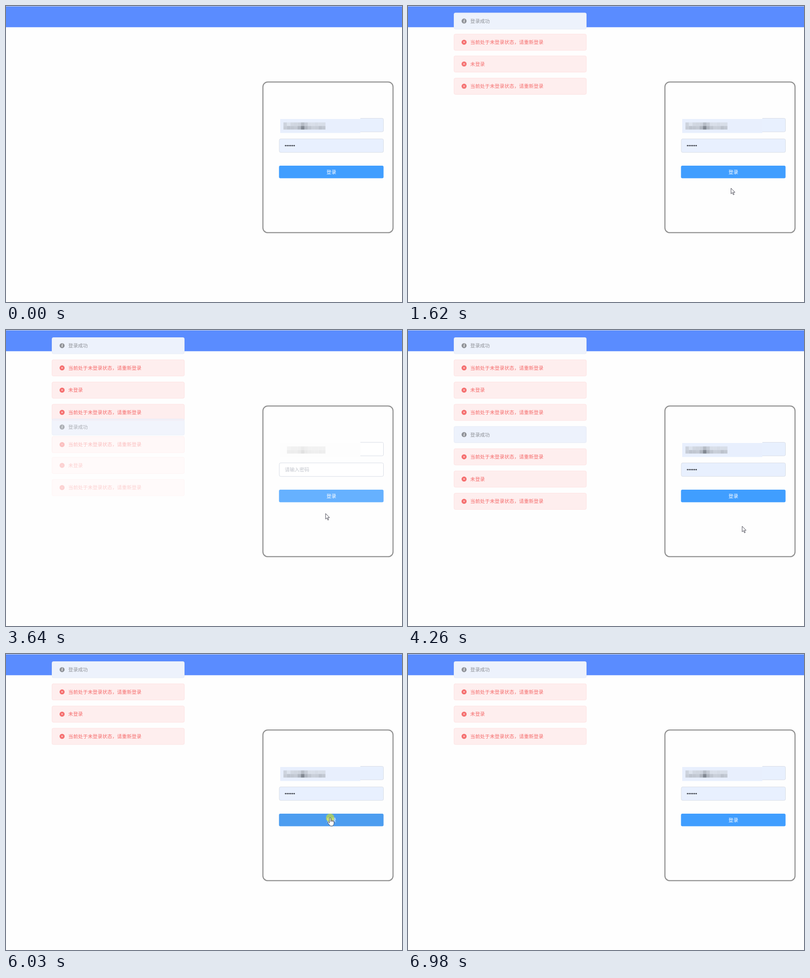
These frames come from a looping animation (865 px wide and 647 px high, 7.99 s). An HTML page with a canvas:

```html
<!DOCTYPE html>
<html lang="zh-CN">
<head>
<meta charset="utf-8">
<style>
html, body { margin: 0; width: 100%; height: 100%; overflow: hidden; background: #fefefe; }
canvas { display: block; }
</style>
</head>
<body>
<canvas id="stage" width="865" height="647"></canvas>
<script>
const ctx = document.getElementById('stage').getContext('2d');
const FONT = '10.67px "Noto Sans CJK SC", "Noto Sans CJK", "Noto Sans", sans-serif';
const LOOP = 7990;

// Each click on the button reloads the page a little later.
const CLICKS = [1000, 3310, 6030];
const RELOADS = [1320, 3514, 6260];

// Pointer stops: time, x, y
const PATH = [
  [150, 771, 597], [700, 708, 358], [1100, 708, 358], [1760, 705, 409],
  [2320, 675, 354], [3400, 675, 354], [3640, 698, 401], [4080, 739, 450],
  [4570, 714.5, 393], [5270, 708, 358], [6110, 708, 358], [6900, 857, 565]
];

const BOX_HEIGHT = 36.5, SLOT = 48.6, LIFE = 2972;
const KINDS = {
  info: { fill: '#edf2fc', border: '#e6ebf5', ink: '#909399' },
  error: { fill: '#feeeee', border: '#fde2e2', ink: '#f56c6c' }
};
const EXPIRED = '当前处于未登录状态，请重新登录';
const messages = RELOADS.flatMap(start => [
  { kind: 'info', text: '登录成功', born: start },
  { kind: 'error', text: EXPIRED, born: start + 52 },
  { kind: 'error', text: '未登录', born: start + 68 },
  { kind: 'error', text: EXPIRED, born: start + 68 }
]);

const ARROW = new Path2D('M0 0V12.2L2.8 9.6 4.9 14.4 6.8 13.6 4.7 9H8.6Z');
const HAND = new Path2D('M-1.4 10.5V1.4a1.4 1.4 0 0 1 2.8 0V6.2q1.4-1 2.6 0 1.4-.7 2.4.3 2-.3 2 1.3V12.5' +
  'q0 2-1.2 3.2-.8 2.3-3.2 2.3H1.5Q-.2 17.6-1 16.2L-5 11.2q-1.2-1.8 0-2.2 1.5-.4 3.6 2.5Z');
const KNUCKLES = new Path2D('M1.4 6V9M4 6.2V9M6.4 6.5V9');

const justAfter = (t, times, from, to) => times.some(s => t >= s + from && t < s + to);
const overButton = ([x, y]) => x > 596 && x < 825 && y > 349 && y < 377;

// cubic-bezier(.25, .1, .25, 1)
function ease(x) {
  if (x <= 0) return 0;
  if (x >= 1) return 1;
  const curve = (s, a, b) => 3 * a * s * (1 - s) ** 2 + 3 * b * s * s * (1 - s) + s ** 3;
  let low = 0, high = 1;
  for (let i = 0; i < 20; i++) {
    const mid = (low + high) / 2;
    if (curve(mid, .25, .25) < x) low = mid; else high = mid;
  }
  return curve(low, .1, 1);
}

function pointerAt(t) {
  const next = Math.max(1, PATH.findIndex(p => p[0] > t));
  if (t >= PATH.at(-1)[0]) return PATH.at(-1).slice(1);
  const [t0, x0, y0] = PATH[next - 1], [t1, x1, y1] = PATH[next];
  const k = Math.max(0, (t - t0) / (t1 - t0));
  return [x0 + (x1 - x0) * k, y0 + (y1 - y0) * k];
}

function box(x, y, w, h, r, fill, border, line = 1) {
  ctx.beginPath();
  ctx.roundRect(x, y, w, h, r);
  if (fill) { ctx.fillStyle = fill; ctx.fill(); }
  if (border) { ctx.strokeStyle = border; ctx.lineWidth = line; ctx.stroke(); }
}

function disc(x, y, r, fill) {
  ctx.beginPath();
  ctx.arc(x, y, r, 0, 7);
  ctx.fillStyle = fill;
  ctx.fill();
}

function label(text, x, y, fill, align = 'left', font = FONT) {
  ctx.font = font;
  ctx.textAlign = align;
  ctx.fillStyle = fill;
  ctx.fillText(text, x, y + 4);
}

// Pixelated user name: random light tiles, darkest around the sixth column.
function drawMosaic(empty) {
  ctx.fillStyle = empty ? '#fdfdfd' : '#e8effd';
  ctx.fillRect(599, 247, 175, 30.5);
  let seed = 7;
  for (let row = 0; row < 2; row++) {
    for (let col = 0; col < 12; col++) {
      seed = seed * 16807 % 2147483647;
      const noise = seed / 2147483647 * 16 - 8;
      const dark = (32 + 24 * row) * Math.exp(-((col - 5) ** 2));
      const v = 213 - 19 * row - dark + noise;
      const pale = 225 + (v - 130) / 5;
      ctx.fillStyle = empty ? `rgb(${pale},${pale},${pale})` : `rgb(${v},${v + 6},${v + 16})`;
      if (!empty || col > 0) ctx.fillRect(606 + col * 7.65, 254.5 + row * 7.8, 7.65, 7.8);
    }
  }
}

function drawForm(t) {
  const empty = justAfter(t, RELOADS, 40, 200);
  const fill = empty ? '#fff' : '#e8f0fe';
  box(561.2, 166.2, 284.2, 329.2, 10.5, null, '#8f8f8f', 2.3);

  ctx.save();
  ctx.beginPath();
  ctx.rect(774, 240, 60, 40);
  ctx.clip();
  box(597, 245.5, 227.5, 29.5, 3, fill, '#d8dde6');
  ctx.restore();
  drawMosaic(empty);

  box(597, 290.5, 227.5, 29.5, 3, fill, '#d8dde6');
  if (empty) label('请输入密码', 609, 305, '#c0c4cc');
  else for (let i = 0; i < 6; i++) disc(610.6 + i * 3.8, 305.2, 1.45, '#3c4048');

  const pressed = justAfter(t, CLICKS, 0, 100);
  const hovered = overButton(pointerAt(t - 150));
  box(596.3, 349, 228.4, 27.5, 3, pressed ? '#4c9df0' : hovered ? '#66b1ff' : '#409eff');
  label('登录', 710.7, 363, '#fff', 'center', '500 ' + FONT);
}

function drawIcon(kind, x, y) {
  disc(x, y, 5.5, KINDS[kind].ink);
  if (kind === 'info') {
    label('i', x, y - .8, '#fff', 'center', 'italic bold 9px "Noto Serif", serif');
    return;
  }
  ctx.beginPath();
  for (const d of [-1.9, 1.9]) {
    ctx.moveTo(x - 1.9, y + d);
    ctx.lineTo(x + 1.9, y - d);
  }
  ctx.strokeStyle = '#fff';
  ctx.lineWidth = 1;
  ctx.stroke();
}

// Messages stack downwards; each one that leaves lets the later ones slide up.
function drawMessages(t) {
  let top = 16;
  for (const { kind, text, born } of messages) {
    const age = t - born, gone = age - LIFE;
    if (age <= 0) break;
    const y = top - BOX_HEIGHT * (1 - ease(age / 400) + ease(gone / 400));
    const { fill, border, ink } = KINDS[kind];
    ctx.globalAlpha = ease(age / 300) * (1 - ease(gone / 300));
    box(100.5, y + .5, 289, BOX_HEIGHT - 1, 3, fill, border);
    drawIcon(kind, 122.5, y + 18.2);
    label(text, 136, y + 18.2, ink);
    top += SLOT * (1 - ease(gone / 400));
  }
  ctx.globalAlpha = 1;
}

function drawPointer(t) {
  if (t < 150 || t >= 6975) return;
  const [x, y] = pointerAt(t);
  if (justAfter(t, CLICKS, 0, 100)) disc(x, y, 9.2, 'rgba(240,240,0,.52)');
  const hand = overButton([x, y]);
  const shape = hand ? HAND : ARROW;
  ctx.save();
  ctx.translate(x, y);
  ctx.fillStyle = '#fff';
  ctx.strokeStyle = '#444450';
  ctx.lineWidth = 1;
  ctx.fill(shape);
  ctx.stroke(shape);
  if (hand) ctx.stroke(KNUCKLES);
  ctx.restore();
}

function draw(t) {
  ctx.fillStyle = '#fefefe';
  ctx.fillRect(0, 0, 865, 647);
  ctx.fillStyle = '#d9dce2';
  ctx.fillRect(0, 0, 865, 1);
  ctx.fillStyle = '#5a8cff';
  ctx.fillRect(0, 1, 865, 45.4);
  const blank = justAfter(t, RELOADS.slice(0, 1), -160, 40);
  if (!blank) drawForm(t);
  drawMessages(t);
  drawPointer(t);
}

const start = performance.now();
function tick() {
  draw((performance.now() - start) % LOOP);
  requestAnimationFrame(tick);
}
tick();
</script>
</body>
</html>
```
